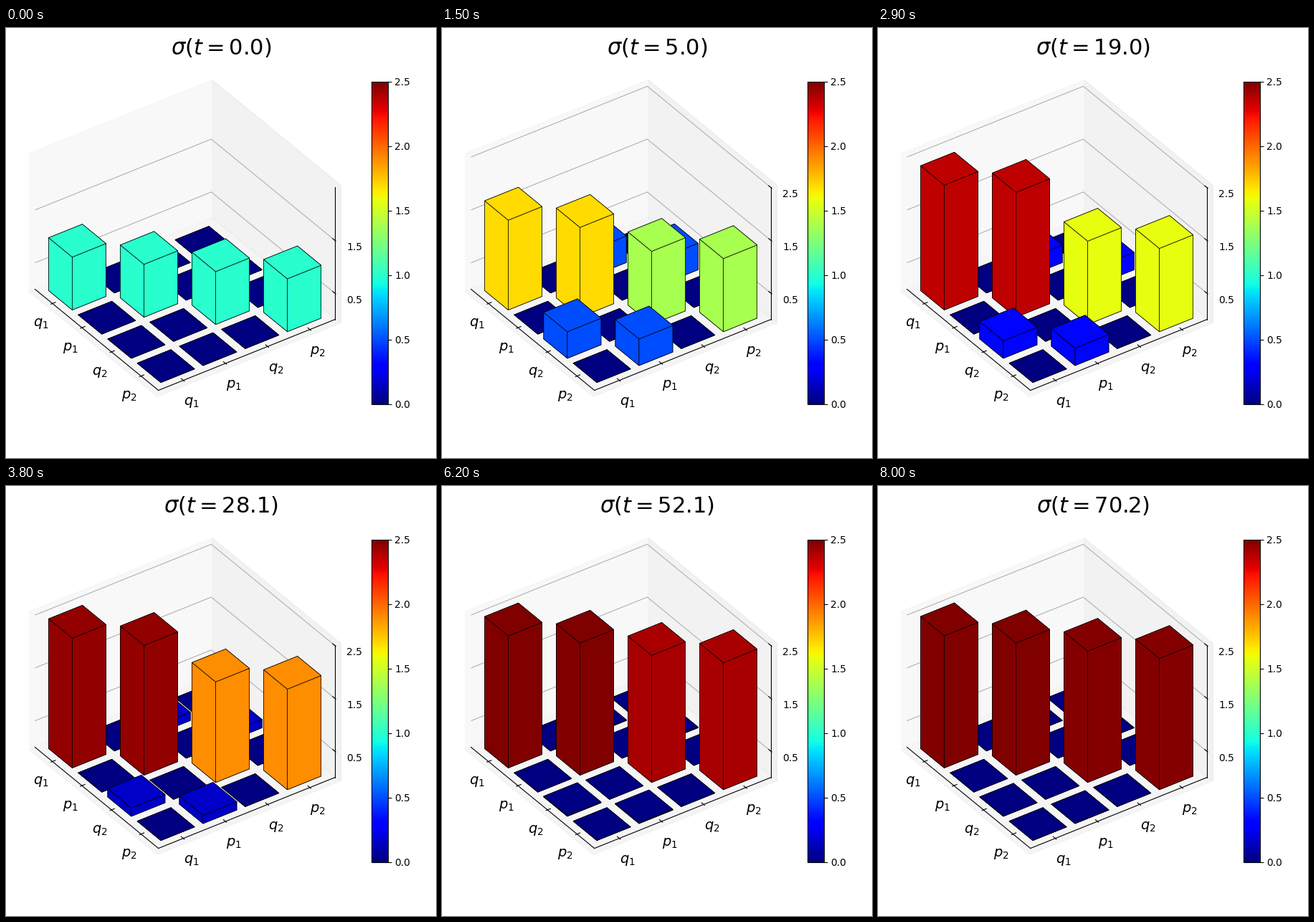
Animation, 600 px wide and 600 px high, one loop 8.5 s. Source, as a matplotlib script:

```python
import itertools

import numpy as np
import matplotlib.pyplot as plt
from matplotlib.animation import FuncAnimation
from matplotlib.cm import ScalarMappable
from matplotlib.collections import PolyCollection
from matplotlib.colors import Normalize

SIZE, DPI = 600, 100
FRAMES, INTERVAL = 85, 100
HOLD, STEPS = 10, 70            # frames at rest before the evolution, moving frames
DT = 400 / 399
GAMMA, BATH = 0.125, 2.5        # damping rate, thermal variance
LABELS = ["$q_1$", "$p_1$", "$q_2$", "$p_2$"]

# Orthographic view of the box
ANGLE = np.radians(35)
S, C = np.sin(ANGLE), np.cos(ANGLE)
SIDE = 486
LOW, HIGH, TOP = -0.19, 3.99, 2.5
UNIT = 1.82946407 * SIDE / 1.85 / np.sqrt(41)
SCALE = UNIT * np.array([4, 4, 3]) / [HIGH - LOW, HIGH - LOW, TOP]
CENTER = np.array([(LOW + HIGH) / 2, (LOW + HIGH) / 2, TOP / 2])
ORIGIN = np.array([SIDE * 95 / 185, 543 - SIDE * 95 / 185])
DELTA = np.array([HIGH - LOW, HIGH - LOW, TOP]) / 12
BASIS = np.array([[S, C * S], [C, -S * S], [0, -C]])


def project(points):
    """Map (x, y, z) data to stage pixels, y pointing down."""
    return ORIGIN + ((np.asarray(points, float) - CENTER) * SCALE) @ BASIS


def covariance(t):
    """Two cascaded damped modes relaxing to the thermal state."""
    g = GAMMA * t
    decay = (BATH - 1) * np.exp(-g)
    a, b, c = BATH - decay, BATH - decay * (1 + g * g), decay * g
    return np.kron([[a, c], [c, b]], np.eye(2))


def bar_faces(x, y, h, w=0.8):
    """Six faces of a bar, the hidden ones first."""
    def corners(*picks):
        return [(x + w * i, y + w * j, h * k) for i, j, k in picks]

    return [
        corners((0, 0, 0), (1, 0, 0), (1, 1, 0), (0, 1, 0)),
        corners((0, 0, 0), (0, 1, 0), (0, 1, 1), (0, 0, 1)),
        corners((0, 1, 0), (1, 1, 0), (1, 1, 1), (0, 1, 1)),
        corners((0, 0, 0), (1, 0, 0), (1, 0, 1), (0, 0, 1)),
        corners((1, 0, 0), (1, 1, 0), (1, 1, 1), (1, 0, 1)),
        corners((0, 0, 1), (1, 0, 1), (1, 1, 1), (0, 1, 1)),
    ]


fig = plt.figure(figsize=(SIZE / DPI, SIZE / DPI), dpi=DPI, facecolor="white")
ax = fig.add_axes([0, 0, 1, 1])
ax.set(xlim=(0, SIZE), ylim=(SIZE, 0))
ax.axis("off")

cmap, norm = plt.get_cmap("jet"), Normalize(0, TOP)
cax = fig.add_axes([0.85, 0.125, 0.0375, 0.75])
fig.colorbar(ScalarMappable(norm, cmap), cax=cax, ticks=np.arange(0, 2.6, 0.5))


def line(points, color="black", z=2):
    return ax.plot(*project(points).T, color=color, lw=0.8, zorder=z,
                   solid_capstyle="butt" if color != "black" else "projecting")[0]


def tick(pos, axis, sign):
    """Short mark crossing an axis line, reaching further inwards."""
    ends = np.array([pos, pos], float)
    ends[:, axis] += sign * DELTA[axis] * np.array([0.1, -0.2])
    return line(ends)


def tick_label(pos, shift, text, size):
    offset = 11.5 * 48 / (2 * SIDE * 72 / DPI) * DELTA * shift
    return ax.text(*project(pos + offset), text, size=size, ha="center", va="top")


# Panes, slightly larger than the box
lo, hi = LOW - DELTA[0] / 4, HIGH + DELTA[0] / 4
zlo, zhi = -DELTA[2] / 4, TOP + DELTA[2] / 4
panes = [
    (0.95, [(lo, lo, zlo), (lo, hi, zlo), (lo, hi, zhi), (lo, lo, zhi)]),
    (0.90, [(lo, hi, zlo), (hi, hi, zlo), (hi, hi, zhi), (lo, hi, zhi)]),
    (0.925, [(lo, lo, zlo), (hi, lo, zlo), (hi, hi, zlo), (lo, hi, zlo)]),
]
for grey, pts in panes:
    ax.add_patch(plt.Polygon(project(pts), closed=False, lw=1, zorder=0,
                             color=(grey, grey, grey, 0.5)))

# Axis lines, ticks, labels and level lines
line([(LOW, LOW, 0), (HIGH, LOW, 0)])
line([(HIGH, LOW, 0), (HIGH, HIGH, 0)])
line([(HIGH, HIGH, 0), (HIGH, HIGH, TOP)])
for i, name in enumerate(LABELS):
    left, right = np.array([i + 0.4, LOW, 0]), np.array([HIGH, i + 0.4, 0])
    tick(left, 1, -1)
    tick_label(left, np.array([0, -1, -1]), name, 14)
    tick(right, 0, 1)
    tick_label(right, np.array([1, 0, -1]), name, 14)
for level in (0.5, 1.5, 2.5):
    pos = np.array([HIGH, HIGH, level])
    level_parts = [
        line([(LOW, LOW, level), (LOW, HIGH, level), (HIGH, HIGH, level)], "#b0b0b0", 1),
        tick(pos, 0, 1),
        tick_label(pos, np.array([1, 1, 0]), f"{level}", 10),
    ]

bars = PolyCollection([], edgecolors="black", linewidths=0.5, zorder=3)
ax.add_collection(bars, autolim=False)
title = ax.text(SIZE / 2, 37, "", size=22, ha="center", va="baseline")


def update(frame):
    step = min(max(frame - HOLD, 0), STEPS)
    t = step * DT
    sigma = covariance(t)
    faces, colors = [], []
    for i, j in itertools.product(range(4), reversed(range(4))):
        faces += bar_faces(i, j, sigma[i, j])
        colors += [cmap(norm(sigma[i, j]))] * 6
    bars.set_verts(list(project(faces)))
    bars.set_facecolor(colors)
    title.set_text(rf"$\sigma(t={t:.1f})$")
    for part in level_parts:        # the top level shows once the motion starts
        part.set_visible(step > 0)
    return bars, title


anim = FuncAnimation(fig, update, frames=FRAMES, interval=INTERVAL,
                     repeat=True, repeat_delay=0, blit=False)
plt.show()
```
